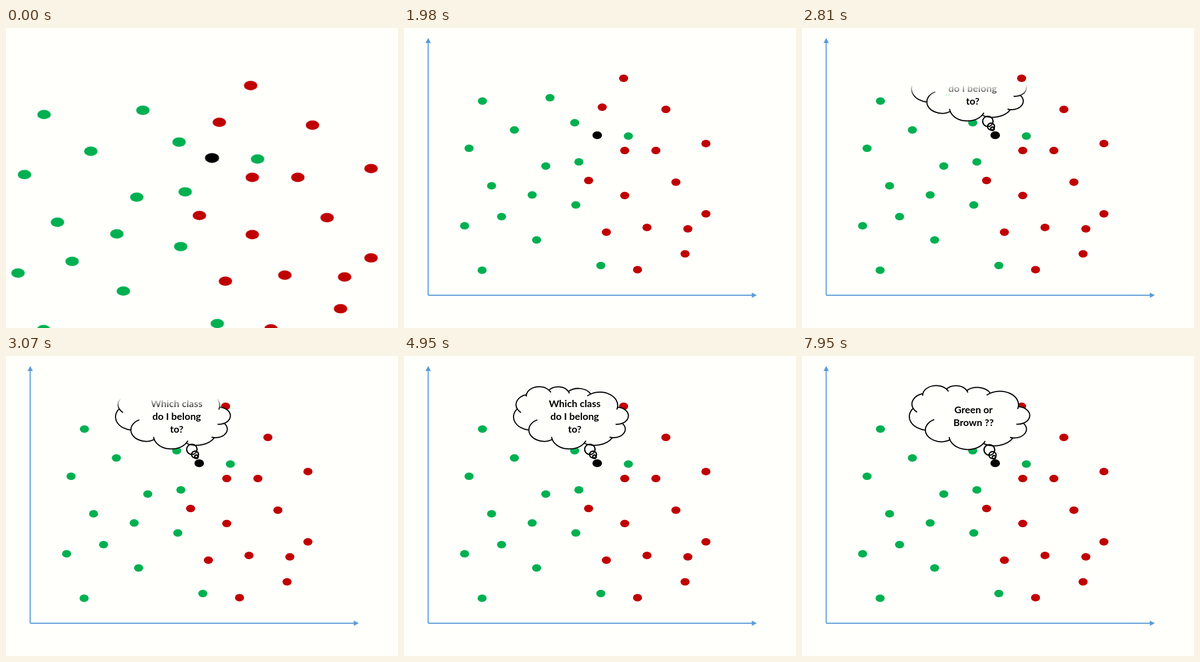
An HTML page for the animation above (8 s loop, 705 by 540 pixels).

```html
<!DOCTYPE html>
<html lang="en">
<head>
<meta charset="utf-8">
<title>Which class do I belong to?</title>
<style>
  html, body { margin: 0; width: 100%; height: 100%; overflow: hidden; background: #fffffc; }
  svg { position: absolute; left: 0; top: 0; width: 705px; height: 540px; }
  .green { fill: #00b050; }
  .red { fill: #c00000; }
  .axes path { stroke: #5b9bd5; stroke-width: 2; }
  .axes polygon { fill: #5b9bd5; }
  .cloud * { fill: none; stroke: #000; stroke-width: 2; }
  .cloud .body { fill: #fffffc; }
  text { font: bold 17.7px Lato, Carlito, sans-serif; text-anchor: middle; }

  /* opening view is stretched and has no axes */
  #dots { transform-origin: 0 0; animation: zoom 8s step-end infinite; }
  .axes { animation: axes 8s step-end infinite; }
  @keyframes zoom {
    0% { transform: matrix(1.463, 0, 0, 1.271, -137.9, -11.4); }
    0.375%, 100% { transform: none; }
  }
  @keyframes axes {
    0% { visibility: hidden; }
    0.375%, 100% { visibility: visible; }
  }

  /* soft wipe from the bottom up */
  #wipe {
    -webkit-mask-image: linear-gradient(transparent 540px, #000 561px);
    -webkit-mask-size: 705px 1200px;
    -webkit-mask-repeat: no-repeat;
    animation: wipe 8s linear infinite;
  }
  @keyframes wipe {
    0%, 24.75% { -webkit-mask-position: 0 -353px; }
    43.75%, 100% { -webkit-mask-position: 0 -508px; }
  }

  #ask { animation: ask 8s step-end infinite; }
  #guess { animation: guess 8s step-end infinite; }
  @keyframes ask {
    0% { visibility: visible; }
    68.875%, 100% { visibility: hidden; }
  }
  @keyframes guess {
    0% { visibility: hidden; }
    68.875%, 100% { visibility: visible; }
  }
</style>
</head>
<body>
<svg viewBox="0 0 705 540">
  <g class="axes">
    <path d="M43.5 481V25M43.5 481H627"/>
    <polygon points="43.5,18 48.3,27 38.7,27"/>
    <polygon points="634.5,481 625.5,476.2 625.5,485.8"/>
  </g>
  <g id="dots"></g>
</svg>
<svg id="wipe" viewBox="0 0 705 540">
  <g id="ask">
    <g class="cloud"></g>
    <text x="307" y="92">Which class</text>
    <text x="307" y="115">do I belong</text>
    <text x="307" y="138">to?</text>
  </g>
</svg>
<svg id="guess" viewBox="0 0 705 540">
  <g class="cloud"></g>
  <text x="308.5" y="103">Green or</text>
  <text x="308.5" y="126">Brown ??</text>
</svg>
<script>
  const NS = 'http://www.w3.org/2000/svg';
  const add = (parent, tag, attrs) => {
    const el = parent.appendChild(document.createElementNS(NS, tag));
    for (const k in attrs) el.setAttribute(k, attrs[k]);
  };

  // The two classes of samples and the unknown one.
  const samples = {
    green: [
      [141, 131.5], [262.5, 125.5], [307, 170.5], [198.5, 183.5], [117, 216.5], [403.5, 194.5],
      [314.5, 241], [255, 248.5], [157.5, 284], [230.5, 300.5], [309, 318.5], [175.5, 339.5],
      [109, 356], [238.5, 381.5], [354, 427.5], [140.5, 436]
    ],
    red: [
      [395, 90.5], [356.5, 142.5], [471, 146.5], [543, 208], [397, 220.5], [453, 220.5],
      [332, 274.5], [489, 277.5], [397, 301.5], [543, 334.5], [437, 359], [510.5, 361.5],
      [364, 367.5], [505.5, 406.5], [420, 435]
    ],
    black: [[347.5, 193]]
  };
  const dots = document.getElementById('dots');
  for (const kind in samples) {
    const rx = kind === 'black' ? 8.6 : 8.2;
    for (const [cx, cy] of samples[kind])
      add(dots, 'ellipse', { cx, cy, rx, ry: rx * 0.81, class: kind });
  }

  // Cusps in percent of the box: x, y, radius of the bump that follows, and the
  // angle by which the bump before (+) or after (-) runs on into the cloud.
  const cusps = [
    [9, 33.3, 15.6, -10], [32.4, 12, 12.35, 14], [52, 7.9, 10.1, -14], [69, 5.7, 11.25, -16],
    [88.7, 12.9, 12.35, 12], [96.8, 35.8, 15.7, 26], [86.6, 69.9, 13.4, -64], [66.1, 85.2, 15.6, -12],
    [38.2, 90.9, 17.9, 12], [13.4, 82.1, 10.1, -15], [4.9, 59.1, 10.05, -34]
  ];
  const tall = 1.361; // height to width of every bump

  // Centre of the bump between two cusps, in a space where bumps are circles.
  function centre([x0, y0, r], [x1, y1]) {
    const dx = x1 - x0, dy = (y1 - y0) / tall;
    const len = Math.hypot(dx, dy), k = Math.sqrt(r * r - len * len / 4) / len;
    return [(x0 + x1) / 2 - dy * k, (y0 + y1) / 2 / tall + dx * k];
  }

  // Draws the cloud mirrored left to right in a box, with bubbles leading down from (bx, by).
  function cloud(group, x, y, w, h, bx, by) {
    const at = (px, py) => `${x + w - px * w / 100} ${y + py * h / 100}`;
    const arc = (r, sweep, end) => `A${r * w / 100} ${r * tall * h / 100} 0 0 ${sweep} ${end}`;
    const n = cusps.length;
    let body = 'M' + at(...cusps[0]), folds = '';
    cusps.forEach((cusp, i) => {
      const [px, py, r, fold] = cusp;
      const next = cusps[(i + 1) % n], prev = cusps[(i + n - 1) % n];
      body += arc(r, 0, at(...next));

      const [from, to] = fold > 0 ? [prev, cusp] : [cusp, next];
      const [cx, cy] = centre(from, to);
      const a = Math.atan2(py / tall - cy, px - cx) + fold * Math.PI / 180;
      const tip = at(cx + from[2] * Math.cos(a), (cy + from[2] * Math.sin(a)) * tall);
      folds += 'M' + at(px, py) + arc(from[2], fold > 0 ? 0 : 1, tip);
    });

    const bubbles = [[0, 12], [0.7, 18], [1, 36]].map(([k, size]) =>
      ({ cx: bx + 8.2 * k, cy: by + 13.4 * k, r: h / size }));
    bubbles.forEach(b => add(group, 'circle', { ...b, class: 'body' }));
    add(group, 'path', { d: body + 'Z', class: 'body' });
    add(group, 'path', { d: folds });
    bubbles.forEach(b => add(group, 'circle', b));
  }

  const [first, second] = document.querySelectorAll('.cloud');
  cloud(first, 197, 55, 205.5, 112, 334.3, 168);
  cloud(second, 193, 53, 215.5, 115, 337, 169);
</script>
</body>
</html>
```
